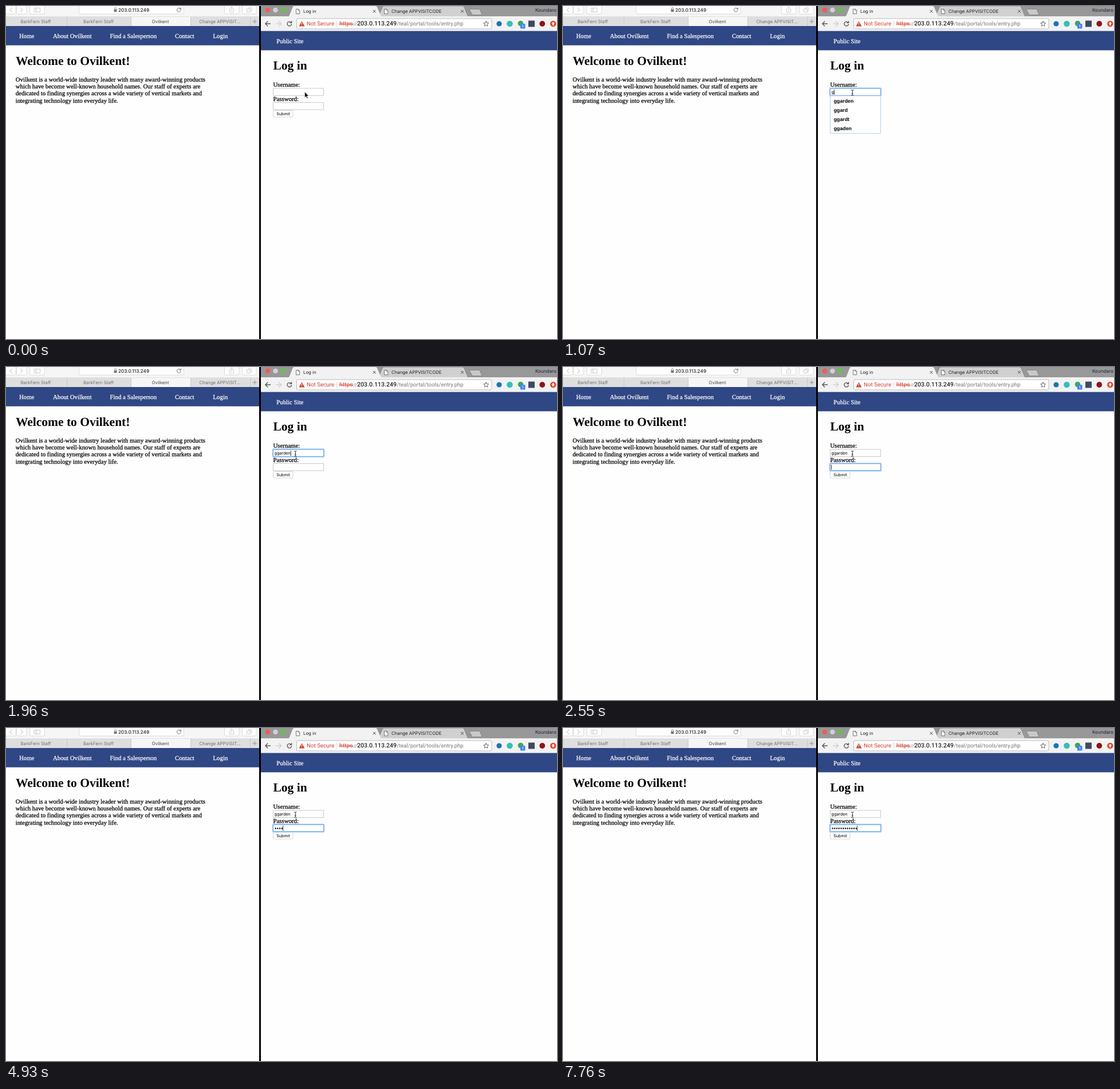
An HTML page that plays this animation: 962x582 px, repeating every 8 s.

```html
<!DOCTYPE html>
<html lang="en">
<head>
<meta charset="utf-8">
<title>Log in</title>
<style>
  html, body { margin: 0; width: 100%; height: 100%; overflow: hidden; background: #fefefe; }
  svg { display: block; }
  text { text-rendering: geometricPrecision; white-space: pre; }
  .serif { font: 10.8px "Liberation Serif", Times, serif; stroke: currentColor; stroke-width: .25; }
  .title { font: bold 21.5px "Liberation Serif", Times, serif; }
  .ui { font: 7.8px Inter, Roboto, sans-serif; }
  .field { font: 7.2px Inter, Roboto, sans-serif; }
  .url { font: 9.8px Roboto, sans-serif; }
  .option { font: bold 8.8px "Liberation Sans", Arial, sans-serif; }
  .line { fill: none; stroke-linecap: round; stroke-linejoin: round; }
</style>
</head>
<body>
<svg id="stage" width="962" height="582" viewBox="0 0 962 582" xmlns="http://www.w3.org/2000/svg"></svg>
<script>
const stage = document.getElementById('stage');
const LOOP = 8000;
const NAVY = '#304785';

const rect = (x, y, w, h, fill, more = '') =>
  `<rect x="${x}" y="${y}" width="${w}" height="${h}" fill="${fill}" ${more}/>`;
const disc = (x, y, r, fill) => `<circle cx="${x}" cy="${y}" r="${r}" fill="${fill}"/>`;
const path = (d, stroke, width = 1) =>
  `<path class="line" d="${d}" stroke="${stroke}" stroke-width="${width}"/>`;
const shape = (d, fill, more = '') => `<path d="${d}" fill="${fill}" ${more}/>`;
const text = (x, y, style, words, color = '#000', more = '') =>
  `<text x="${x}" y="${y}" class="${style}" fill="${color}" color="${color}" ${more}>${words}</text>`;
const middle = 'text-anchor="middle"';

function leftWindow() {
  const button = (x, w) => rect(x, -4, w, 18, '#fdfdfd', 'rx="2.5" stroke="#dcdcdc"');
  const tab = (x, w, label, active) =>
    rect(x, 19, w, 16, active ? '#f6f6f6' : '#dedede') +
    rect(x + w, 19, 1, 16, '#cacaca') +
    text(x + w / 2 - 1, 30, 'ui', label, active ? '#444' : '#6e6e6e', middle);
  const nav = [[23, 'Home'], [82, 'About Ovilkent'], [181.5, 'Find a Salesperson'],
    [295, 'Contact'], [361.5, 'Login']];
  const lines = ['Ovilkent is a world-wide industry leader with many award-winning products',
    'which have become well-known household names. Our staff of experts are',
    'dedicated to finding synergies across a wide variety of vertical markets and',
    'integrating technology into everyday life.'];
  return rect(0, 0, 442, 19, '#f6f6f6') +
    button(-2.5, 19.5) + button(18.5, 17.5) + button(41.5, 26) +
    button(127.5, 183) + button(381.5, 25.5) + button(412.5, 24.5) +
    path('M10.5 3 7 6.8l3.5 3.7M25.5 3 29 6.8l-3.5 3.7', '#b9b9b9') +
    path('M49.5 3.5h10v7h-10zM53 3.5v7M51 5.5h.8M51 7.5h.8', '#c2c2c2', .8) +
    rect(188.5, 6, 5, 4.2, '#777', 'rx=".6"') + path('M189.5 6V4.5a1.5 1.5 0 0 1 3 0V6', '#777', .9) +
    text(196, 10, 'ui', '203.0.113.249', '#222', 'style="font-size:8.2px;font-weight:500"') +
    path('M305 5.1a3.5 3.5 0 1 0 .4 2.3M305.4 2.9v2.4H303', '#666', .9) +
    path('M392 5h-1.5v6h7V5H396M394 8V1.5M392.3 3l1.7-1.7L395.7 3', '#c5c5c5', .8) +
    path('M421 5h5.5v5.5H421zM423 5V3h5.5v5.5H426.5', '#c5c5c5', .8) +
    rect(0, 18.5, 442, 1, '#cecece') +
    tab(0, 106, 'BarkFern Staff') + tab(107, 111, 'BarkFern Staff') +
    tab(219, 103, 'Ovilkent', true) + tab(323, 103, 'Change APPVISIT...') +
    rect(427, 19, 15, 16, '#dedede') + path('M431 27h6.5M434.25 23.75v6.5', '#888', .9) +
    rect(0, 35, 442, 33.7, NAVY) +
    nav.map(([x, label]) => text(x, 56, 'serif', label, '#fff')).join('') +
    text(17, 102.5, 'title', 'Welcome to Ovilkent!') +
    lines.map((l, i) => text(16.7, 132 + i * 12.2, 'serif', l)).join('') +
    rect(442, 0, 3, 582, '#000');
}

function rightWindow() {
  const page = x => shape(`M${x} 5.5h4l2.2 2.2v6h-6.2z`, '#fff', 'stroke="#666" stroke-width=".9"') +
    path(`M${x + 4} 5.5v2.2h2.2`, '#666', .8);
  const cross = x => path(`M${x - 2} 7.2l4.2 4.2m0-4.2l-4.2 4.2`, '#444');
  return rect(445, 0, 517, 19, '#989898') +
    disc(457, 7, 4.3, '#f25b56') + disc(470.5, 7, 4.3, '#d2d2d2') + disc(484, 7, 4.3, '#62c445') +
    shape('M650 18.5 657 2Q658 0 660 0H797Q799 0 800 2L807 18.5Z', '#d0d0d0', 'stroke="#777" stroke-width=".8"') +
    shape('M810 5.5h15.5q1.5 0 2 1.2l3 7.3q.4 1.5-1.2 1.5H815.5q-1.5 0-2-1.2L809.5 7q-.5-1.5.5-1.5Z',
      '#c9c9c9', 'stroke="#7c7c7c" stroke-width=".8"') +
    rect(445, 18, 517, 26, '#f2f2f2') +
    shape('M492 19Q494 18 495 16L500.5 2Q501.5 0 503.5 0H645Q647 0 648 2L654 16Q655 18 657 19Z', '#f2f2f2') +
    page(506.5) + text(519, 12, 'ui', 'Log in', '#222') + cross(643) +
    page(660.5) + text(673, 12, 'ui', 'Change APPVISITCODE', '#222') + cross(796.5) +
    text(924, 10, 'ui', 'Koundaro', '#16213c', 'style="font-size:8.1px"') +
    path('M461.5 31h-8.5m3.8-4-4 4 4 4', '#555', 1.3) +
    path('M472 31h8.5m-3.8-4 4 4-4 4', '#cfcfcf', 1.3) +
    path('M497.8 28.8a3.8 3.8 0 1 0 .7 3.2M498.6 26.6v2.8h-2.8', '#555', 1.3) +
    rect(507.5, 22, 340.5, 18, '#fff', 'rx="2" stroke="#b9b9b9"') +
    shape('M516.5 26.5 521.5 35.5H511.5Z', '#d23f31') +
    path('M516.5 29.5v2.5M516.5 33.8v.1', '#fff') +
    text(525, 34.4, 'url', 'Not Secure', '#d23f31') +
    rect(577, 25.5, 1, 11, '#d6d6d6') +
    text(582, 34.4, 'url', 'https', '#d23f31', 'style="font-size:10.3px"') +
    path('M582 31.5H606', '#d23f31', .9) +
    text(605.3, 34.4, 'url', '://', '#777', 'style="font-size:8.2px"') +
    text(613, 34.4, 'url', '203.0.113.249', '#222', 'style="font-size:10.6px;font-weight:500"') +
    text(682.3, 34.4, 'url', '/teal/portal/tools/entry.php', '#777', 'style="font-size:9.5px"') +
    path('M838.3 26.5l1.3 3 3.2.3-2.4 2.2.7 3.2-2.8-1.7-2.8 1.7.7-3.2-2.4-2.2 3.2-.3z', '#555', .9) +
    disc(861, 31, 4.6, '#1f72b8') + disc(879.5, 31, 5.3, '#35c0b6') +
    disc(898.5, 30.5, 4.8, '#3fa65c') + rect(898, 31, 8.5, 8.5, '#4285f4', 'rx="1"') +
    text(902.2, 38, 'ui', '1', '#fff', middle + ' style="font-size:7px"') +
    rect(912, 25.5, 11, 11, '#3d4a60') + disc(936.3, 31, 4.9, '#8c1419') +
    disc(955.3, 31, 5.3, '#e2492f') + shape('M955.3 27.8l3 3.3h-1.8v2.7h-2.4v-2.7h-1.8z', '#fff') +
    rect(445, 43.7, 517, 33.7, NAVY) +
    text(472.3, 65, 'serif', 'Public Site', '#fff') +
    text(466.5, 111, 'title', 'Log in') +
    text(466.5, 141, 'serif', 'Username:') + text(466.5, 166, 'serif', 'Password:') +
    rect(466.5, 182.5, 34.5, 11.5, '#fff', 'rx="2" stroke="#cfcfcf" stroke-width=".9"') +
    text(484, 190.9, 'field', 'Submit', '#000', middle);
}

stage.innerHTML = rect(0, 0, 962, 582, '#fefefe') + leftWindow() + rightWindow() + '<g id="form"></g>';
const form = document.getElementById('form');

const names = ['ggarden', 'ggard', 'ggardt', 'ggaden'];
const base = { focus: '', typed: 0, dots: 0, caret: false, options: 0, beam: 0 };

// Each step lists what differs from the step before it.
const steps = [
  [0, {}],
  [150, { beam: 511 }],
  [310, { beam: 505.3 }],
  [470, { focus: 'user', caret: true }],
  [920, { caret: false }],
  [1070, { typed: 1, caret: true, options: 4 }],
  [1210, { typed: 2 }],
  [1360, { typed: 3 }],
  [1660, { typed: 5, options: 3 }],
  [1810, { typed: 6, options: 1 }],
  [1960, { typed: 7, options: 0 }],
  [2550, { focus: 'pass' }],
  [3000, { dots: 1 }],
  [3150, { dots: 2 }],
  [3440, { dots: 1 }],
  [3590, { dots: 0, caret: false }],
  [4030, { caret: true }],
  [4180, { dots: 1 }],
  [4480, { dots: 2 }],
  [4630, { dots: 3 }],
  [4930, { dots: 4 }],
  [5370, { dots: 5 }],
  [5820, { caret: false }],
  [6270, { dots: 6, caret: true }],
  [6570, { dots: 7 }],
  [6860, { dots: 8 }],
  [7160, { dots: 9 }],
  [7310, { dots: 10 }],
  [7610, { dots: 11 }],
  [7760, { dots: 12 }]
];

const stateAt = time => steps.reduce(
  (state, [start, change]) => start <= time ? { ...state, ...change } : state, base);

function input(y, focused) {
  if (!focused) return rect(466.5, y, 88, 12.5, '#fff', 'stroke="#c9c9c9"');
  return rect(466, y - .3, 89, 13, '#fff', 'rx="1" stroke="#cfe2fa" stroke-width="3"') +
    rect(466.3, y, 88.4, 12.4, '#fff', 'rx=".8" stroke="#73acf0" stroke-width="1.5"');
}

function cursor(x) {
  if (!x) return shape('M521.5 150v10l2.3-2.1 1.7 3.7 1.6-.7-1.7-3.6h3.1z', '#000', 'stroke="#fff" stroke-width=".6"');
  return path(`M${x - 1.8} 146.8q1.8 0 1.8 1.2 0-1.2 1.8-1.2M${x} 148v7` +
    `M${x - 1.8} 156.2q1.8 0 1.8-1.2 0 1.2 1.8 1.2M${x - 1} 152.5h2`, '#222', .9);
}

function dropdown(count) {
  if (!count) return '';
  return rect(466.5, 157, 88, 16 * count + 1.5, '#fff', 'stroke="#a9cdf0" stroke-width=".9"') +
    names.slice(0, count).map((n, i) => text(472.7, 169.4 + 16 * i, 'option', n)).join('');
}

function draw(time) {
  const s = stateAt(time);
  const inUser = s.focus === 'user', inPass = s.focus === 'pass';
  let dots = '';
  for (let i = 0; i < s.dots; i++) dots += disc(470.6 + 3.75 * i, 175.5, 1.2, '#000');
  form.innerHTML = input(144, inUser) + input(168.7, inPass) + dots +
    text(468.5, 153, 'field', names[0].slice(0, s.typed), '#000', 'id="typed"') +
    dropdown(s.options) + cursor(s.beam);
  if (!s.caret) return;
  const end = s.typed ? document.getElementById('typed').getComputedTextLength() : 0;
  const x = inUser ? 468.5 + end : 468.3 + 3.75 * s.dots;
  form.innerHTML += rect(x, inUser ? 146.2 : 170.7, .8, 8.8, '#000');
}

let last = -1;
const origin = performance.now();
function tick() {
  const time = (performance.now() - origin) % LOOP;
  const step = steps.filter(([start]) => start <= time).length;
  if (step !== last) draw(time);
  last = step;
  requestAnimationFrame(tick);
}
tick();
</script>
</body>
</html>
```
